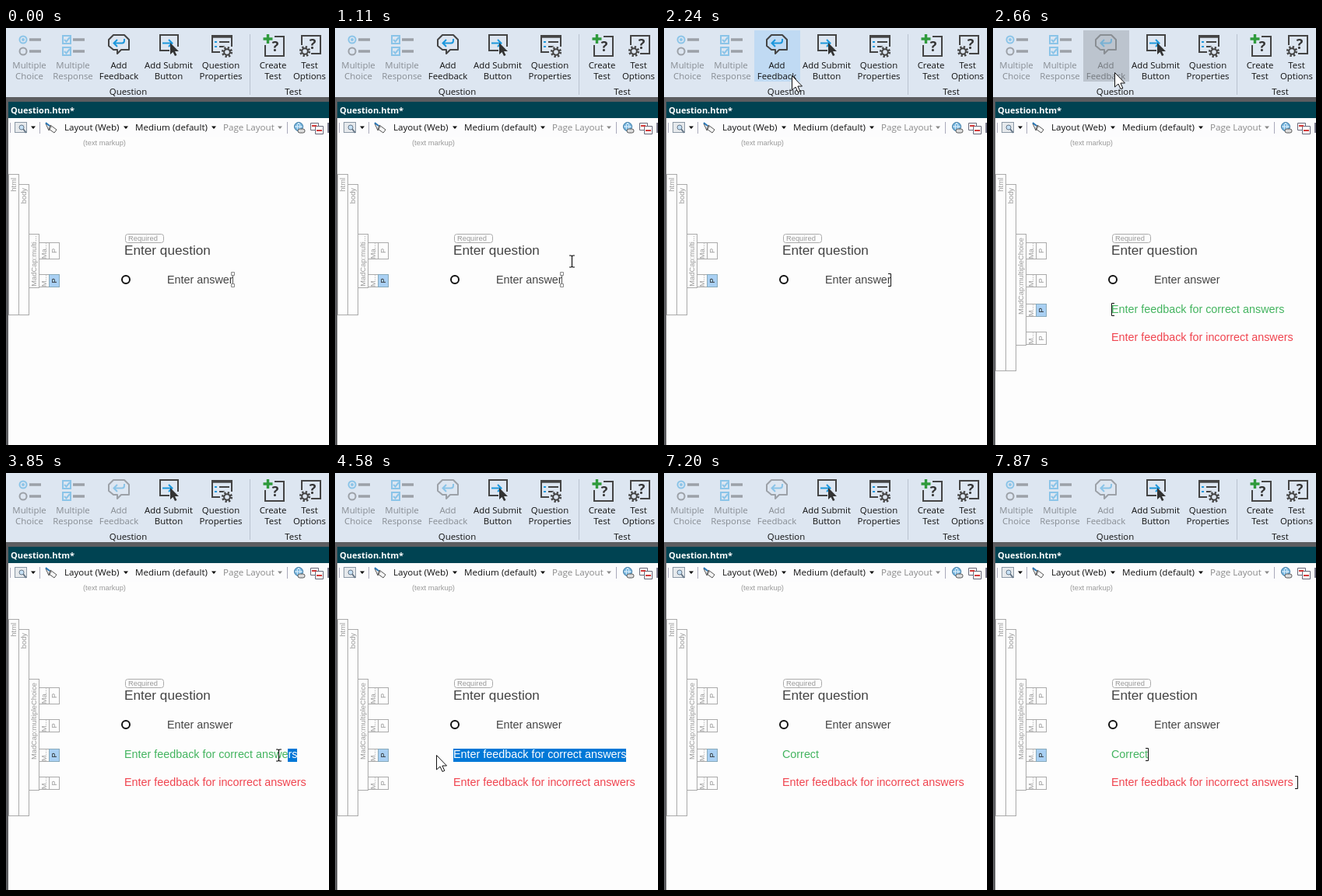
An HTML page that plays this animation: 415 by 537 pixels, repeating every 8000 ms.

```html
<!DOCTYPE html>
<html lang="en">
<head>
<meta charset="utf-8">
<title>Adding question feedback</title>
<style>
html, body { margin: 0; width: 100%; height: 100%; overflow: hidden; background: #fdfdfd; }
svg { display: block; width: 415px; height: 537px; }
text { white-space: pre; }
.ui { font: 11.4px "Open Sans", "Noto Sans", sans-serif; fill: #111; }
.mid { text-anchor: middle; }
.tool { font-size: 11.6px; }
.doc { font: 14.35px "Liberation Sans", Arial, sans-serif; }
.small { font: 9.33px "Liberation Sans", Arial, sans-serif; fill: #999; }
.ink { fill: none; stroke: #444; stroke-width: 2; }
.bar { fill: none; stroke: #444; stroke-width: 3.4; }
.blue { fill: none; stroke: #1c97dc; stroke-width: 2; }
.tag { fill: #fdfdfd; stroke: #aaa; }
.off { opacity: .42; }
</style>
</head>
<body>
<svg viewBox="0 0 415 537">
  <defs>
    <text id="mark" class="mid" font-family="Open Sans, sans-serif" font-size="18" font-weight="700" fill="#333">?</text>
    <g id="gear">
      <circle r="8" fill="#dde6f1"/>
      <circle r="5.6" fill="none" stroke="#444" stroke-width="3" stroke-dasharray="2.2 2.2"/>
      <circle r="3.8" class="ink"/>
    </g>
    <path id="drop" d="M-3 -1.5H3L0 2Z"/>
    <clipPath id="selClip"><rect id="clipBox" y="354" height="19"/></clipPath>
  </defs>

  <rect width="415" height="537" fill="#fdfdfd"/>
  <rect width="415" height="91" fill="#dde6f1"/>
  <path d="M313.5 8V86" stroke="#b9c3cf"/>
  <rect id="btn" x="116" y="3" width="59" height="66"/>
  <g id="labels"></g>

  <g class="off">
    <circle cx="22" cy="15" r="4.5" class="blue"/><circle cx="22" cy="15" r="2" fill="#1c97dc"/>
    <circle cx="22" cy="30" r="4.5" class="ink"/>
    <path class="bar" d="M30 15H45M30 30H45M86 15H101M86 30H101"/>
    <path class="blue" d="M73 10H83V20H73ZM73 25H83V35H73ZM75 15L77.5 17.5L82 12M75 30L77.5 32.5L82 27"/>
  </g>
  <g id="feedback">
    <path class="ink" d="M138 9H152L158 15V28H148L143 33V28H138L132 23V15Z" stroke-linejoin="round"/>
    <path class="blue" d="M143 15L138.5 19.5L143 24M138.5 19.5H149Q152 19.5 152 16V14"/>
    <text x="145" y="52" class="ui mid">Add</text>
    <text x="145" y="66" class="ui mid">Feedback</text>
  </g>
  <g>
    <path class="ink" d="M210 29H198V9H221V24"/>
    <path class="blue" d="M201 19.5H213M209 15L213.5 19.5L209 24"/>
    <path d="M211 19V34L214.5 31L217 36L219.5 35L217 30H222Z" fill="#333"/>
  </g>
  <g>
    <path class="ink" d="M275 31H265V10H290V24"/>
    <path class="bar" d="M264 11H291"/>
    <path class="blue" d="M268 18H271M268 24H271"/>
    <path class="ink" d="M274 18H287M274 24H281"/>
    <use href="#gear" x="284" y="31"/>
  </g>
  <g>
    <path class="ink" d="M345 11H357V36H333V22"/>
    <use href="#mark" x="346" y="30"/>
    <path d="M336.5 8V20M330.5 14H342.5" stroke="#2f9a3c" stroke-width="3.4"/>
  </g>
  <g>
    <path class="ink" d="M380 22V10H404V33H392"/>
    <use href="#mark" x="394" y="27"/>
    <use href="#gear" x="384" y="30"/>
  </g>

  <path d="M0 89H415V95H3V537H0Z" fill="#5c5d60"/>
  <rect x="3" y="95" width="412" height="21" fill="#004352"/>
  <text x="6" y="110" class="ui" style="font-size:11px;font-weight:700;fill:#fff">Question.htm*</text>

  <rect x="3" y="116" width="412" height="24" fill="#fcfcfd"/>
  <path d="M5.5 122V135M43.5 121V136M361.5 121V136" stroke="#aab"/>
  <rect id="menu" x="161.5" y="117.5" width="112" height="21" fill="#a8d2f5" stroke="#0078d7"/>
  <g>
    <rect x="11.5" y="121.5" width="15" height="13" fill="#e6e9ec" stroke="#8b98a5"/>
    <circle cx="20" cy="128" r="3" fill="#c7e2f7" stroke="#678"/><path d="M22 130L26 135" stroke="#678" stroke-width="2"/>
    <path d="M51 123L58 127L55 132ZM57 125L65 131L62 135L55 130Z" fill="#f5f5f5" stroke="#555"/>
    <path d="M51 122L56 126" stroke="#2a78b8" stroke-width="2"/>
    <circle cx="376" cy="127" r="5.5" fill="#78b7df" stroke="#3674a0"/>
    <path d="M371 127H381M376 122Q372 127 376 132Q380 127 376 122" fill="none" stroke="#e8f5ff"/>
    <rect x="375" y="130" width="9" height="5" rx="2.5" fill="#ddd" stroke="#555"/>
    <path d="M391.5 122.5H401.5V131.5H391.5Z" fill="#fff" stroke="#667"/>
    <path d="M397.5 126.5H407.5V136.5H397.5Z" fill="#fff" stroke="#667"/>
    <path d="M393 126H399M399 132H406" stroke="#d13a3a" stroke-width="2"/>
    <path d="M413 122H415V135H413Z" fill="#778"/>
  </g>
  <use href="#drop" x="35" y="128"/><use href="#drop" x="154" y="128"/>
  <use href="#drop" x="267" y="128"/><use href="#drop" x="352" y="128" fill="#888"/>
  <text x="75" y="132" class="ui tool">Layout (Web)</text>
  <text x="166" y="132" class="ui tool">Medium (default)</text>
  <text x="279" y="132" class="ui tool" style="fill:#888">Page Layout</text>

  <text x="99" y="151" class="small">(text markup)</text>
  <g id="before"></g>
  <g id="after"></g>
  <rect x="153.5" y="265.5" width="49" height="11" rx="3" fill="none" stroke="#aaa"/>
  <text x="157" y="274" class="small">Required</text>
  <text x="152" y="292" class="doc" style="font-size:17.2px" fill="#444">Enter question</text>
  <circle cx="154" cy="324" r="5" fill="#fff" stroke="#111" stroke-width="2"/>
  <text x="207" y="329" class="doc" fill="#444">Enter answer</text>
  <g id="handles" fill="#fff" stroke="#888">
    <path d="M291.5 319V329" stroke="#555"/>
    <path d="M289.5 314.5h4v4h-4zM289.5 329.5h4v4h-4z"/>
  </g>

  <g id="notes">
    <text id="right" x="152" y="367" class="doc" fill="#43b45f"></text>
    <rect id="sel" y="355" height="17" fill="#0078d7"/>
    <text x="152" y="367" class="doc" fill="#fff" clip-path="url(#selClip)">Enter feedback for correct answers</text>
    <text x="152" y="403" class="doc" fill="#f0444f">Enter feedback for incorrect answers</text>
  </g>
  <path id="carets" fill="none" stroke="#111"/>
  <path id="arrow" d="M0 0V18.5L4.5 14.5L7.5 21L10.3 19.8L7.4 13.5H13Z" fill="#fff" stroke="#111"/>
  <path id="beam" d="M-3.5 -7.5H-1L0 -6.5L1 -7.5H3.5M0 -6.5V6.5M-3.5 7.5H-1L0 6.5L1 7.5H3.5" fill="none" stroke="#111" stroke-width="1.2"/>
</svg>

<script>
const $ = id => document.getElementById(id);
const LOOP = 8000;
const PROMPT = "Enter feedback for correct answers";

const label = (x, y, s, cls = "") => `<text x="${x}" y="${y}" class="ui mid ${cls}">${s}</text>`;
$("labels").innerHTML = [
  [30, "Multiple", "Choice", "off"], [86, "Multiple", "Response", "off"],
  [209, "Add Submit", "Button"], [276, "Question", "Properties"],
  [343, "Create", "Test"], [390, "Test", "Options"]
].map(([x, a, b, c]) => label(x, 52, a, c) + label(x, 66, b, c)).join("")
  + label(157, 86, "Question") + label(369, 86, "Test");

// Upright structure tag; text reads upward, centred in short tags, else ending near the top.
function tag(x, top, bottom, name, on) {
  const short = bottom - top <= 70;
  const y = short ? (top + bottom) / 2 + .5 : top + 5;
  return `<rect class="tag" x="${x + .5}" y="${top + .5}" width="13" height="${bottom - top}"` +
    `${on ? ' style="fill:#a9d0f3;stroke:#8ab"' : ""}/>` +
    `<text class="small" text-anchor="${short ? "middle" : "end"}"` +
    ` transform="translate(${x + 10} ${y}) rotate(-90)"${on ? ' style="fill:#222"' : ""}>${name}</text>`;
}
function tree(bottom, name, rows, active) {
  const end = rows[rows.length - 1] + 16;
  return tag(3, 188, bottom, "html") + tag(16, 201, bottom, "body") + tag(29, 265, end + 1, name) +
    rows.map((y, i) => {
      const h = i ? 16 : 21;
      return tag(42, y, y + h, i ? "M..." : "Ma...") + tag(55, y, y + h, "P", i === active);
    }).join("");
}
$("before").innerHTML = tree(369, "MadCap:multi...", [276, 317], 1);
$("after").innerHTML = tree(441, "MadCap:multipleChoice", [276, 317, 355, 391], 2);

// Each track holds [time, ...values]; a value lasts until the next entry.
const pointer = [
  [0, ""], [560, "beam", 392, 321], [690, "beam", 357, 320], [830, "beam", 330, 327], [960, "beam", 308, 334],
  [1110, "beam", 304, 300], [1240, "beam", 298, 256], [1360, "beam", 286, 210],
  [1480, "beam", 270, 168], [1610, "arrow", 254, 136], [1720, "arrow", 243, 122],
  [1860, "arrow", 234, 114], [1990, "arrow", 212, 92], [2110, "arrow", 184, 72], [2240, "arrow", 164, 61],
  [2380, "arrow", 158, 58], [2510, "arrow", 156, 57], [2810, "arrow", 157, 70], [2940, "arrow", 161, 79],
  [3080, "beam", 176, 165], [3205, "beam", 207, 290], [3330, "beam", 240, 390],
  [3480, "beam", 322, 378], [3600, "beam", 378, 364], [3730, "beam", 368, 363], [3850, "beam", 350, 363],
  [3970, "beam", 300, 363], [4090, "beam", 230, 363], [4210, "beam", 168, 363],
  [4330, "beam", 150, 364], [4460, "arrow", 136, 364], [4580, "arrow", 130, 363],
  [5400, "beam", 132, 364], [7200, ""], [7330, "beam", 344, 429], [7470, "beam", 364, 427],
  [7620, "beam", 382, 414], [7740, "beam", 388, 401], [7870, ""]
];
const selection = [
  [0, 374], [3730, 367], [3850, 362], [3970, 313], [4090, 244], [4210, 176], [4330, 152], [5400, 374]
];
const typed = [
  [0, PROMPT], [5400, "C"], [5670, "Co"], [5790, "Cor"], [5940, "Corr"],
  [6070, "Corre"], [6350, "Correc"], [6640, "Correct"]
];
const bracket = (x, y, d = -1) => `M${x + 3.5 * d} ${y}H${x}V${y + 16}H${x + 3.5 * d}`;
const caret = [
  [0, ""], [1990, bracket(291.5, 316.5)], [2380, ""], [2660, bracket(152.5, 354.5, 1)], [3080, ""],
  ...[[5530, 162], [5670, 170], [5790, 175], [5940, 180], [6070, 188], [6350, 195], [6640, 199]]
    .map(([t, x]) => [t, bracket(x + .5, 354.5)]),
  [7200, ""], [7620, bracket(199.5, 354.5)],
  [7870, bracket(199.5, 354.5) + bracket(391.5, 390.5)]
];
const button = [[0, "none"], [2240, "#c0daf3"], [2660, "#bcc4ce"], [2810, "none"]];

const at = (track, t) => track.findLast(step => step[0] <= t).slice(1);
const show = (id, on) => { $(id).style.display = on ? "" : "none"; };

function draw(t) {
  const added = t >= 2660;
  show("before", !added);
  show("after", added);
  show("notes", added);
  show("handles", t < 1240);
  show("menu", t >= 1610 && t < 1990);
  $("feedback").setAttribute("class", added ? "off" : "");
  $("btn").setAttribute("fill", at(button, t)[0]);

  const [x] = at(selection, t);
  for (const id of ["sel", "clipBox"]) {
    $(id).setAttribute("x", x);
    $(id).setAttribute("width", 374 - x);
  }
  $("right").textContent = at(typed, t)[0];
  $("carets").setAttribute("d", at(caret, t)[0]);

  const [kind, px, py] = at(pointer, t);
  for (const id of ["arrow", "beam"]) {
    show(id, kind === id);
    if (kind === id) $(id).setAttribute("transform", `translate(${px + .5} ${py + .5})`);
  }
}

const start = performance.now();
function tick() {
  draw((performance.now() - start) % LOOP);
  requestAnimationFrame(tick);
}
tick();
</script>
</body>
</html>
```
